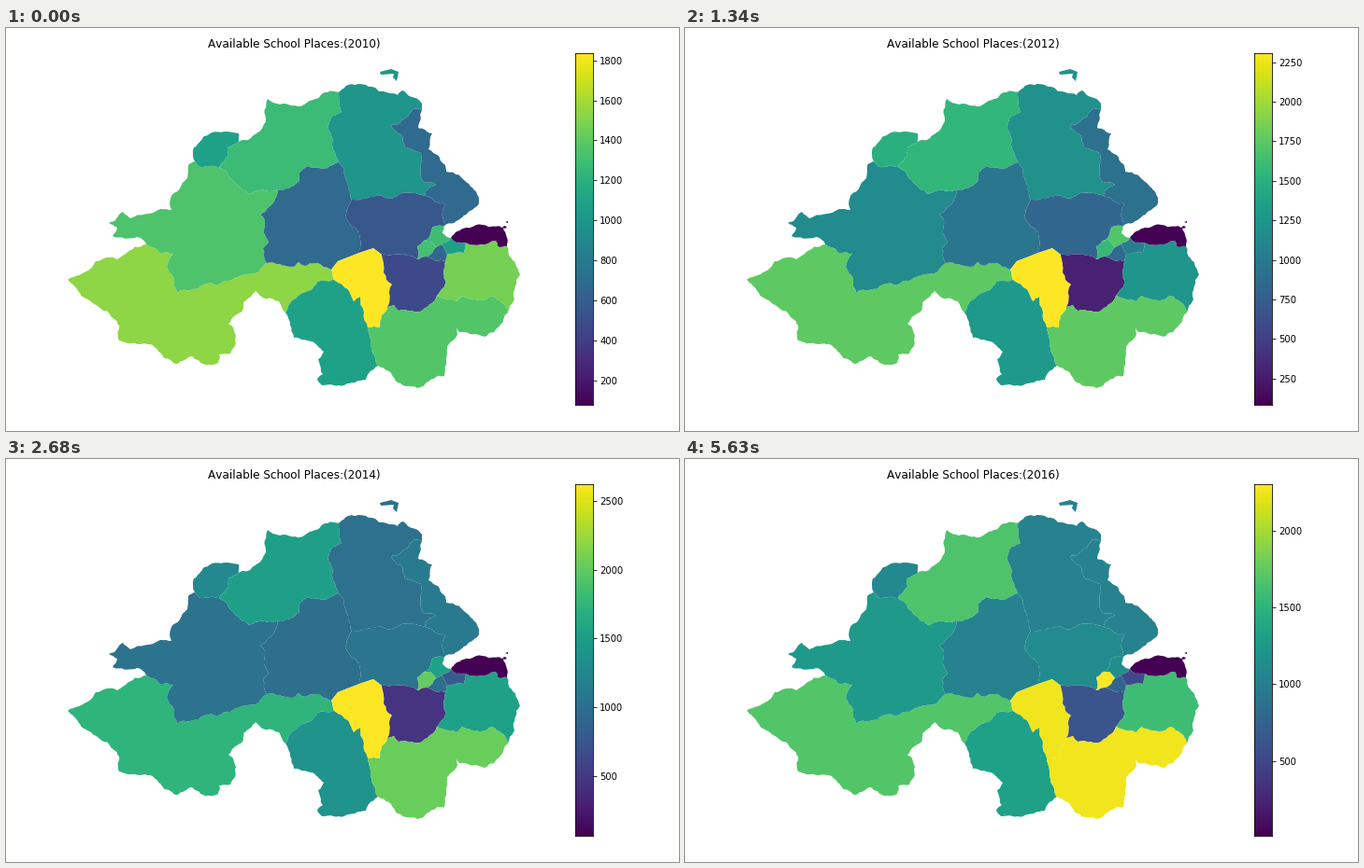
Animation of 720x432 px, one loop 6.7 s. Source, as a matplotlib script:

```python
import numpy as np
import matplotlib.pyplot as plt
from matplotlib.animation import FuncAnimation
from matplotlib.collections import PolyCollection

W, H, DPI = 720, 432, 72
FIRST_YEAR, YEARS, STEPS = 2010, 7, 10
plt.rcParams["font.family"] = "DejaVu Sans"
plt.rcParams["text.kerning_factor"] = 6
rng = np.random.default_rng(4)
lines = {}


def rough(pts, amount):
    """Fractal line: displace midpoints sideways until the steps are short."""
    while True:
        step = np.diff(pts, axis=0)
        size = np.hypot(*step.T)
        if size.max() < 5:
            return pts
        shift = amount * rng.uniform(-1, 1, len(step)) * (size > 4)
        side = np.column_stack([-step[:, 1], step[:, 0]])
        mids = (pts[:-1] + pts[1:]) / 2 + shift[:, None] * side
        pts = np.insert(pts, np.arange(1, len(pts)), mids, axis=0)


def line(areas, *coords, amount=0.13):
    """A coast belongs to one area, a border to two."""
    lines[areas] = rough(np.array(coords, float).reshape(-1, 2), amount)


def outline(area):
    """Chain every line that touches an area into one ring."""
    parts = [pts for areas, pts in lines.items() if area in areas]
    ring = parts.pop(0)
    while parts:
        _, i, end = min((np.abs(pts[end] - ring[-1]).sum(), i, end)
                        for i, pts in enumerate(parts) for end in (0, -1))
        part = parts.pop(i)
        ring = np.vstack([ring, part if end == 0 else part[::-1]])
    return ring


# South-west
line("A", 150, 232, 128, 242, 119, 248, 96, 250, 78, 265, 66, 270, 78, 283,
     91, 293, 121, 319, 121, 335, 158, 341, 183, 360, 199, 352, 213, 361,
     227, 359, 228, 350, 240, 349, 246, 330, 238, 317, 253, 303, 254, 294,
     267, 282, 292, 293, 299, 305)
line("AB", 150, 232, 165, 241, 179, 242, 172, 256, 183, 284, 212, 275,
     227, 275, 252, 265, 267, 263, 279, 252)
line("AG", 279, 252, 306, 256, 313, 251, 320, 255, 331, 252, 348, 259)
line("AI", 348, 259, 351, 270)
line("AK", 299, 305, 306, 292, 326, 281, 333, 272, 351, 270)

# West and north-west
line("B", 150, 232, 140, 224, 114, 223, 119, 214, 110, 209, 125, 197,
     133, 204, 165, 194, 177, 195, 176, 183, 194, 161, 195, 147, 202, 143)
line("BC", 202, 143, 208, 149, 228, 149)
line("BD", 228, 149, 238, 158, 251, 172, 260, 178, 290, 173)
line("BG", 290, 173, 288, 183, 272, 200, 277, 206, 276, 220, 281, 229,
     275, 236, 279, 252)
line("C", 202, 143, 201, 128, 212, 116, 236, 111, 249, 113, 249, 122)
line("CD", 228, 149, 238, 137, 237, 128, 249, 122)
line("D", 249, 122, 268, 113, 278, 100, 280, 76, 293, 82, 319, 82, 357, 68)
line("DE", 357, 68, 359, 90, 350, 94, 345, 109, 350, 130, 356, 144)
line("DG", 290, 173, 313, 165, 314, 155, 322, 148, 335, 150, 356, 144)

# North and north-east
line("E", 357, 68, 366, 61, 395, 64, 399, 68, 419, 72, 425, 67, 445, 81,
     445, 88)
line("EF", 445, 88, 436, 86, 430, 95, 412, 104, 427, 128, 444, 134, 447, 165,
     460, 168, 448, 175, 448, 180)
line("EG", 356, 144, 363, 160, 370, 184)
line("EH", 370, 184, 390, 181, 413, 183, 423, 177, 448, 180)
line("F", 445, 88, 441, 107, 456, 113, 452, 130, 469, 146, 471, 154, 495, 167,
     505, 180, 505, 190, 488, 203, 469, 212)
line("FH", 448, 180, 459, 186, 470, 188, 467, 197, 469, 212)

# Centre
line("GH", 370, 184, 363, 202, 378, 219, 378, 241)
line("GI", 348, 259, 355, 250, 378, 241, amount=0)
line("HI", 378, 241, 393, 236, 402, 243, amount=0)
line("HJ", 402, 243, 440, 248)
line("HO", 469, 212, 457, 213, 446, 229)
line("HP", 446, 229, 440, 234, 440, 248)
line("IJ", 402, 243, 404, 262, 413, 275, 408, 299)
line("IL", 408, 299, 402, 308, 400, 321, 387, 321)
line("IK", 351, 270, 358, 274, 372, 293, 379, 288, 387, 321)

# City areas
line("O", 469, 212, 467, 220, 476, 225)
line("OP", 446, 229, 454, 228, 460, 235)
line("OQ", 460, 235, 466, 232)
line("OR", 466, 232, 476, 225)
line("PQ", 460, 235, 450, 245)
line("JP", 440, 248, 450, 245)
line("JQ", 450, 245, 470, 250)
line("QR", 466, 232, 472, 242)
line("MQ", 472, 242, 470, 250)
line("MR", 472, 242, 490, 241, 492, 230)
line("NR", 476, 225, 482, 230, 492, 230)

# East and south
line("MN", 492, 230, 524, 228, 526, 234, 536, 234)
line("N", 476, 225, 489, 215, 516, 213, 532, 214, 536, 234)
line("M", 536, 234, 541, 247, 550, 264, 544, 291, 537, 305)
line("JM", 470, 250, 470, 274, 461, 287)
line("JL", 461, 287, 443, 304, 420, 303, 415, 297, 408, 299)
line("LM", 461, 287, 482, 293, 488, 287, 508, 292, 520, 287, 537, 305)
line("KL", 387, 321, 390, 340, 398, 362)
line("L", 398, 362, 440, 386, 469, 373, 472, 341, 483, 328, 481, 319,
     485, 326, 512, 331, 529, 318, 537, 305)
line("K", 398, 362, 388, 370, 385, 377, 338, 383, 333, 376, 339, 371,
     334, 355, 340, 347, 308, 332, 299, 305)

# Lowest and highest value in each year
LOWS = 79, 70, 85, 55, 68, 59, 14
HIGHS = 1837, 2125, 2309, 2451, 2623, 2243, 2304

# Turning points (year, percent of the year's range), straight in between
trends = {
    "A": [(0, 83), (1, 75), (2, 75), (3, 63), (4, 65), (5, 81), (6, 73)],
    "B": [(0, 72), (1, 50), (2, 48), (3, 38), (4, 38), (6, 54)],
    "C": [(0, 57), (2, 63), (3, 42), (4, 47), (5, 39), (6, 47)],
    "D": [(0, 68), (2, 66), (3, 48), (6, 72)],
    "E": [(0, 52), (3, 49), (4, 37), (5, 49), (6, 44)],
    "F": [(0, 34), (6, 44)],
    "G": [(0, 34), (1, 41), (4, 36), (5, 44)],
    "H": [(0, 27), (4, 39), (5, 48)],
    "I": [(5, 100), (6, 98)],
    "J": [(0, 22), (1, 25), (2, 9), (4, 15), (6, 26)],
    "K": [(0, 57), (5, 50), (6, 57)],
    "L": [(0, 73), (4, 77), (5, 95), (6, 98)],
    "M": [(0, 79), (2, 52), (4, 57), (5, 69)],
    "N": [(0, 0)],
    "O": [(0, 69), (2, 73), (3, 57), (4, 57), (5, 49)],
    "P": [(0, 70), (2, 67), (4, 76), (5, 93), (6, 100)],
    "Q": [(0, 33), (1, 28), (2, 34), (4, 36), (5, 24), (6, 32)],
    "R": [(0, 56), (5, 22)],
}

shapes = [(area, outline(area)) for area in trends]
shapes += [
    ("E", [(400, 47), (412, 44), (420, 47), (418, 57), (414, 53), (415, 49),
           (401, 50)]),
    ("N", [(531, 213), (534, 212), (536, 214), (533, 215)]),
    ("N", [(534, 208), (537, 207), (537, 209)]),
]

fig = plt.figure(figsize=(W / DPI, H / DPI), dpi=DPI, facecolor="white")
ax = fig.add_axes([0, 0, 1, 1])
ax.set(xlim=(0, W), ylim=(H, 0))
ax.axis("off")
regions = ax.add_collection(PolyCollection([s for _, s in shapes],
                                           linewidths=0))
title = ax.text(308.2, 21, "", fontsize=12, ha="center", va="baseline")

cax = fig.add_axes([609.3 / W, 28.3 / H, 18.85 / W, 377 / H])
bar = cax.imshow(np.linspace(0, 1, 256)[:, None], cmap="viridis",
                 origin="lower", aspect="auto")
cax.set_xticks([])
cax.yaxis.tick_right()


def draw(frame):
    year = min(frame, YEARS - 1)  # the last year is held
    levels = [np.interp(year, *zip(*trends[area])) for area, _ in shapes]
    regions.set_facecolor(plt.cm.viridis(np.array(levels) / 100))
    title.set_text(f"Available School Places:({FIRST_YEAR + year})")
    bar.set_extent((0, 1, LOWS[year], HIGHS[year]))
    cax.set_ylim(LOWS[year], HIGHS[year])
    return regions, title, bar


anim = FuncAnimation(fig, draw, frames=STEPS, interval=670, repeat=True,
                     repeat_delay=0, blit=False)
plt.show()
```
